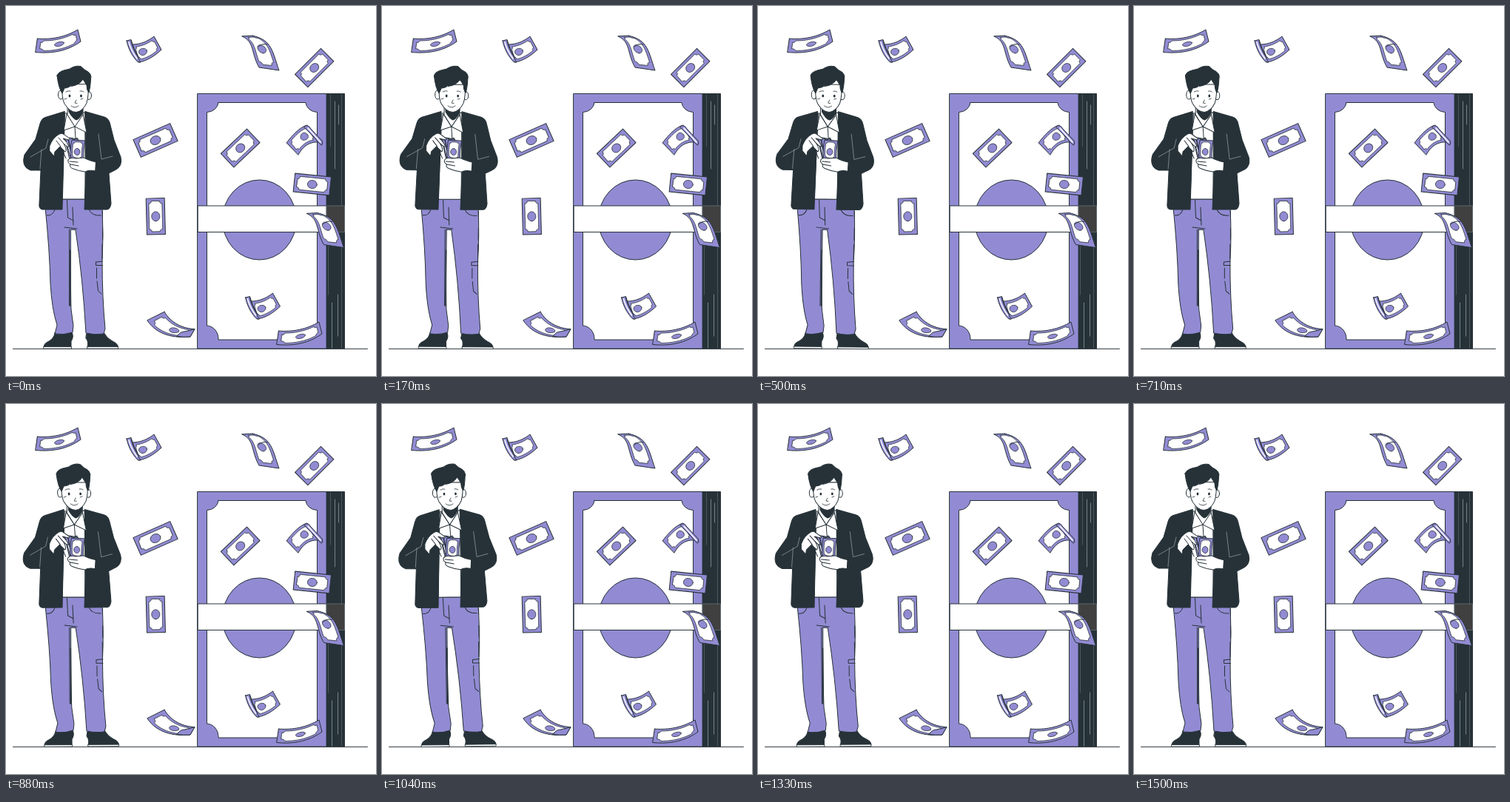
An HTML page with a canvas that plays this animation: 500x500 px, repeating every 1540 ms.

```html
<!DOCTYPE html>
<html lang="en">
<head>
<meta charset="utf-8">
<title>Counting money</title>
<style>
  html, body { margin: 0; width: 100%; height: 100%; overflow: hidden; background: #fff; }
  canvas { display: block; width: 500px; height: 500px; }
</style>
</head>
<body>
<canvas id="stage"></canvas>
<script>
const INK = '#263238', PURPLE = '#928bd3', WHITE = '#fff', GREY = '#8f979b';
const LOOP = 1540, FRAME = 1000 / 24, SWAY = 1500;
const canvas = document.getElementById('stage');
const ratio = window.devicePixelRatio || 1;
canvas.width = canvas.height = 500 * ratio;
const ctx = canvas.getContext('2d');

function shape(d, fill, stroke = INK, width = 1) {
  const path = typeof d === 'string' ? new Path2D(d) : d;
  if (fill) { ctx.fillStyle = fill; ctx.fill(path); }
  if (stroke) { ctx.strokeStyle = stroke; ctx.lineWidth = width; ctx.stroke(path); }
}
const line = (d, color = INK, width = 1) => shape(d, null, color, width);

function disc(x, y, rx, ry, fill, stroke = INK) {
  const path = new Path2D();
  path.ellipse(x, y, rx, ry, 0, 0, Math.PI * 2);
  shape(path, fill, stroke);
}

function at(dx, dy, draw) {
  ctx.save();
  ctx.translate(dx, dy);
  draw();
  ctx.restore();
}

// Point on a Bezier curve of any degree
function curve(points, u) {
  let p = points;
  while (p.length > 1) {
    p = p.slice(1).map((b, i) => [p[i][0] + (b[0] - p[i][0]) * u, p[i][1] + (b[1] - p[i][1]) * u]);
  }
  return p[0];
}

// A banknote stretched between two curved long edges
function note(top, bottom, eye = 0.5, ru = 0.13, rv = 0.22) {
  const trace = uvs => {
    const path = new Path2D();
    for (const [u, v] of uvs) path.lineTo(...curve([curve(top, u), curve(bottom, u)], v));
    path.closePath();
    return path;
  };
  const steps = (n, f) => Array.from({ length: n + 1 }, (_, i) => f(i / n));
  const edge = (u0, u1, v) => steps(16, s => [u0 + (u1 - u0) * s, v]);
  const notch = (u, v, from) => steps(5, s => {
    const a = from - s * Math.PI / 2;
    return [u + 0.07 * Math.cos(a), v + 0.14 * Math.sin(a)];
  });
  const q = Math.PI / 2, a = 0.08, b = 0.14;
  shape(trace([...edge(0, 1, 0), ...edge(1, 0, 1)]), PURPLE);
  shape(trace([
    ...notch(a, b, q), ...edge(a + 0.07, 1 - a - 0.07, b),
    ...notch(1 - a, b, 2 * q), ...notch(1 - a, 1 - b, 3 * q),
    ...edge(1 - a - 0.07, a + 0.07, 1 - b), ...notch(a, 1 - b, 0)
  ]), WHITE, INK, 0.8);
  shape(trace(steps(24, s => [eye + ru * Math.cos(s * 4 * q), 0.5 + rv * Math.sin(s * 4 * q)])), PURPLE, INK, 0.8);
}

function flatNote(x, y, degrees, w = 49, h = 25) {
  ctx.save();
  ctx.translate(x, y);
  ctx.rotate(degrees * Math.PI / 180);
  note([[-w / 2, -h / 2], [w / 2, -h / 2]], [[-w / 2, h / 2], [w / 2, h / 2]]);
  ctx.restore();
}

const saggingNote = () => note(
  [[42, 44], [72, 46.5], [97, 32]],
  [[40, 62.5], [76, 66], [101, 48]], 0.5, 0.11, 0.15);

function curledNote() {
  note([[170, 52], [186, 52], [200, 41]], [[179, 76], [194, 74], [210, 59]], 0.34, 0.17, 0.19);
  shape('M163 47L169 45.500Q172 58 179 69Q179 73 182 76Q178 77 174 71Q166 61 163 47Z', PURPLE);
  line('M166 49Q169 60 177 71', WHITE, 1.4);
  line('M169 47Q171 58 179 70');
}

function wavyNote() {
  note(
    [[333, 40], [360, 46], [360, 62], [369, 87]],
    [[319, 41], [336, 48], [331, 64], [342, 83]], 0.52, 0.12, 0.21);
  line('M341 55Q346 50 353 52');
}

function rolledNote() {
  note([[379, 185], [395, 164], [407, 161]], [[395, 201], [405, 183], [422, 184]], 0.6, 0.16, 0.21);
  shape('M403 163Q408 159 412 166L427 182Q429 187 426 188Q421 184 417 178L407 168Z', PURPLE);
  line('M408 165L425 184', WHITE, 1.6);
}

function tippedNote() {
  note(
    [[214, 413], [223, 429], [240, 436], [255, 436.5]],
    [[191, 425], [204, 445], [228, 449], [249, 447]], 0.55, 0.11, 0.2);
  shape('M231 446.500Q235 440 241 440Q247 439 255 436.500L249 447Q240 448 231 446.500Z', PURPLE);
}

function bundle() {
  shape('M259 118.5H433.5V463H259Z', PURPLE);
  shape('M287 130.5H405A16 14 0 0 0 420.5 143.5V438A14 14 0 0 0 406.5 451H287A16 18 0 0 0 271.5 432V143.5A16 14 0 0 0 287 130.5Z', WHITE);
  disc(342.5, 289, 50, 54, PURPLE);
  shape('M259.5 270H433.5V305.5H259.5Z', WHITE);
  shape('M433.5 118.5H457.5V463H433.5Z', INK);
  line('M444.5 129V220M449.5 134V160M440.5 401V462M448.5 390V446', GREY, 0.8);
  line('M438.5 120V190M453.5 119V270M453.5 320V462M435.5 320V390', '#566167', 0.8);
  shape('M433.5 270H457.5V305.5H433.5Z', '#404040', '#687074', 0.8);
}

function flyingNotes() {
  flatNote(202, 181.5, -23.8, 54.5, 26);
  flatNote(316.7, 192, -43.5, 48.5, 25.5);
  flatNote(416.7, 83.5, -45, 49.5, 24.5);
  flatNote(202.3, 284.3, 88.5);
  flatNote(413.8, 241, 5.8);
  saggingNote();
  at(326, 395, saggingNote);
  curledNote();
  at(160.5, 347, curledNote);
  wavyNote();
  at(87.5, 239.5, wavyNote);
  rolledNote();
  tippedNote();
}

function legs() {
  shape('M66 442L89 441Q92 447 88 453V461H51Q51 456 58 453Q65 449 66 442Z', INK);
  shape('M109 443L132 441Q136 449 144 453Q151 456 151.500 461H110Q112 453 108 449Z', INK);
  shape('M51 460.500H88.500V463H51ZM110 460.500H151.500V463H110Z', WHITE, INK, 0.8);
  shape('M53 272L76 261H106L130 272Q132 310 130 345Q130 395 134 436L132 443Q120 445 108 442Q104 370 94 302.500L87.500 302Q87 380 88 410L91 432L90 441Q78 445 66 443L69 431Q62 410 60 375Q59 330 53 272Z', PURPLE);
  line('M82.500 262L83.500 286L91 290M90 272L91 296M79 299L96 301M85.500 302V405');
  line('M87 330V405', INK, 1.5);
  line('M55 283Q63 284 66 275M112 275Q116 284 128 283');
  line('M130.500 277V285M130.500 300V316M130 322V342M121.500 346L130.500 345M121.500 346V350.500H130.500M122.500 354V368M123 372L124.500 385L129 389');
}

function jacket() {
  shape('M80 145L107 144V261H76Z', WHITE);
  shape('M79 142.500L53 150.500Q48 152 46 159L40 180L25 201Q20 217 33 222L47 222L45 267Q44 274 49 275H76L78 200L79 150Z', INK);
  shape('M107 142.500L133 150Q139 152 140.500 159L146 181L155 204Q158 217 147 222L139 226L142 267Q141 274 137 275H106L108 222Z', INK);
  line('M57 180L54 192L33 204M48 194L46 220M125 173L129 207L144 203', GREY, 0.8);
  shape('M82 146L78 168L93 163Z', WHITE);
  shape('M104 146L109 171L93 163Z', WHITE);
  shape('M83 136V147L93 163L104 147V136Z', WHITE);
  shape('M85 138Q94 147 104 138L103 146Q99 153 95 154Q90 152 85 143Z', INK);
  line('M93 163L94 179');
}

function hands() {
  shape('M80 180L86 178L97 180L92 207L86 206Z', PURPLE);
  line('M81 182L88 206M84 180L90 206', INK, 1.4);
  line('M82.500 184L88 204', WHITE);
  note([[88, 206], [86, 196], [89, 181]], [[105, 208], [104, 196], [107, 182]], 0.42, 0.18, 0.22);
  line('M88 179L92 181L96 178L98 181');
  shape('M59 189Q63 178 72 173Q76 171 79 174L86 179Q88 182 81 180L77 179Q83 184 85 190Q83 191 78 186Q83 195 80 197L73 190L66 197L65 203L59 196Z', WHITE);
  line('M71 178L78 186M68 182L74 190M76 194L81 206');
  shape('M84 208Q87 204 94 206L105 205Q112 209 122 211L121 223Q112 221 107 224Q98 223 91 220Q85 218 87 214Q83 212 84 208Z', WHITE);
  line('M87 214L98 216M86 210L97 211');
  shape('M121 210L128 207L129 223L120 227Z', INK, null);
}

function head() {
  disc(74, 120, 3.5, 6, WHITE);
  disc(112, 121, 3.5, 5.5, WHITE);
  shape('M76 106Q75 125 79 132Q86 143.500 95 143.500Q104 142 109 131Q112 121 111 106Z', WHITE);
  shape('M69 94Q71 89 78 87L86 85Q93 80 101 81.500L106 86Q117 91 114.500 99Q114 110 112 117Q109 114 109 107L104 99Q99 107 88 108.500L91 104Q86 111 79 111L76 118Q71 111 69 94Z', INK);
  disc(86, 121.500, 1.4, 1.9, INK, null);
  disc(101.500, 121.500, 1.4, 1.9, INK, null);
  line('M81 116Q84 114 87 115M100 115Q102 114 105 116M95 127L93 131L96 131.500M88 135Q93 139 98 135M79 126L82 125M101 126L104 125', INK, 0.8);
}

// Degrees: 0, 1 at a quarter, -1 at three quarters, back to 0
function swayAngle(ms) {
  const p = ms / SWAY;
  return p < 0.25 ? 4 * p : p < 0.75 ? 2 - 4 * p : 4 * p - 4;
}

function render() {
  const step = Math.min(36, Math.floor((performance.now() % LOOP + 5) / FRAME));
  ctx.setTransform(ratio, 0, 0, ratio, 0, 0);
  ctx.lineJoin = ctx.lineCap = 'round';
  ctx.fillStyle = WHITE;
  ctx.fillRect(0, 0, 500, 500);
  line('M9.500 463.300H488.500');
  bundle();
  flyingNotes();
  ctx.translate(89.5, 272);
  ctx.rotate(swayAngle(step * FRAME) * Math.PI / 180);
  ctx.translate(-89.5, -272);
  legs();
  jacket();
  hands();
  head();
  requestAnimationFrame(render);
}
render();
</script>
</body>
</html>
```
